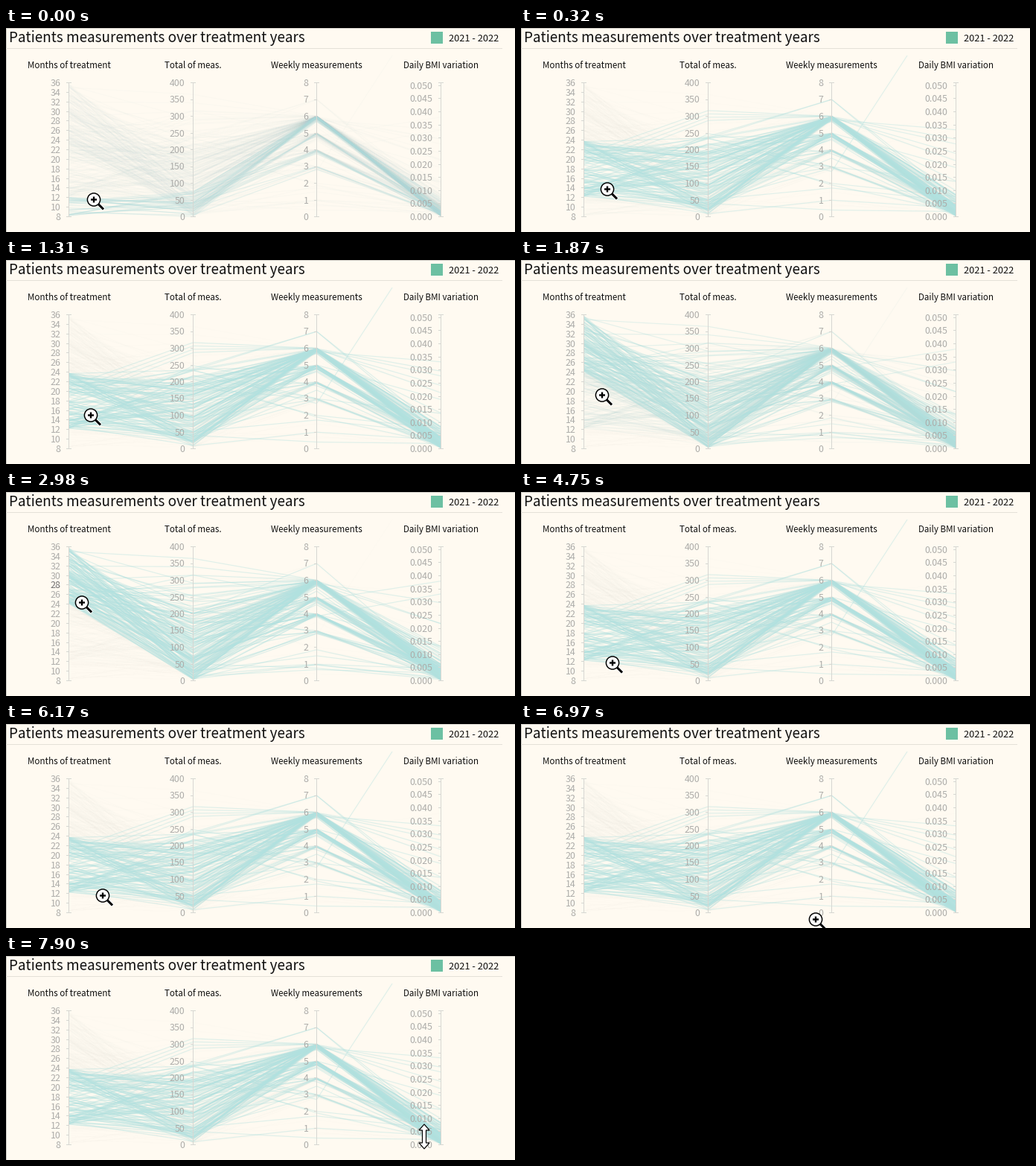
Write a matplotlib script that moves like this. It is 684 by 274 pixels and loops after 8000 ms.

```python
import numpy as np
import matplotlib.pyplot as plt
from matplotlib.animation import FuncAnimation
from matplotlib.collections import LineCollection
from matplotlib.patches import Circle, Polygon, Rectangle
from matplotlib.transforms import Affine2D

W, H = 684, 274
STEP, LOOP = 50, 8000
TOP, BOTTOM = 73.5, 253.5
PAPER, AXIS, TICK = "#fffaf1", "#d6d7d2", "#adadaa"
TEAL = np.array([177, 225, 223]) / 255
DIM = np.array([166, 204, 206]) / 255

plt.rcParams["font.family"] = ["Noto Sans CJK JP", "DejaVu Sans"]
fig = plt.figure(figsize=(W / 72, H / 72), dpi=72, facecolor=PAPER)
ax = fig.add_axes([0, 0, 1, 1])
ax.set(xlim=(0, W), ylim=(H, 0))
ax.axis("off")

# title, low, high, tick step, decimals
AXES = [
    ("Months of treatment", 8, 36, 2, 0),
    ("Total of meas.", 0, 400, 50, 0),
    ("Weekly measurements", 0, 8, 1, 0),
    ("Daily BMI variation", 0, 0.0511, 0.005, 3),
]
XS = 84.5 + 166.67 * np.arange(4)
XS = np.floor(XS) + 0.5


def scale(value, low, high):
    return BOTTOM - (value - low) / (high - low) * (BOTTOM - TOP)


def text(x, y, s, size, color="#111111", ha="left"):
    return ax.text(x, y, s, size=size, color=color, ha=ha, va="baseline", zorder=5)


def rule(xs, ys, color):
    ax.plot(xs, ys, color=color, lw=1, snap=False, solid_capstyle="butt", zorder=4)


# Patient data
rng = np.random.default_rng(12)


def patients(n, months, ends, totals, skew, steady, mean, tail, extra):
    """Random rows of months, total, weekly rate and BMI variation."""
    lo, hi = months
    missed = np.minimum(rng.geometric(steady, n) - 1, 5)
    bmi = rng.exponential(mean, n) + 0.0003
    rows = np.column_stack([
        lo + (hi - lo) * rng.beta(*ends, n),
        totals[0] + (totals[1] - totals[0]) * rng.beta(*skew, n),
        6 - missed - np.minimum(rng.exponential(0.09, n), 0.7),
        np.where(rng.random(n) < tail, rng.uniform(0.008, 0.036, n), bmi),
    ])
    return np.vstack([rows, *extra])


high = [(18 + k, 287 + 10 * k, 6, 0.002 + 0.002 * k) for k in range(4)]
top = [(26 + 3 * k, 290 + 25 * k, 6, 0.002 * k) for k in range(4)]
data = [
    patients(30, (8.2, 12), (0.8, 0.5), (0, 100), (0.9, 1.7), 0.6, 0.0015, 0, []),
    patients(130, (12.3, 23.8), (0.7, 0.8), (8, 253), (1.1, 1.6), 0.58, 0.0027, 0.07,
             [high, [(23.7, 235, 2.7, 0.09), (14, 40, 0.4, 0.002),
                     (20, 240, 7, 0.005), (21, 235, 7, 0.007)]]),
    patients(150, (24.1, 35.8), (0.8, 1.1), (3, 348), (0.75, 2), 0.45, 0.0025, 0.03,
             [top, [(33, 200, 4.8, 0.038), (30, 200, 7, 0.004)]]),
]
window = Rectangle((0, 37), W, H - 37, transform=ax.transData)


def bundle(rows):
    ys = np.column_stack([scale(rows[:, i], a[1], a[2]) for i, a in enumerate(AXES)])
    lines = LineCollection([np.column_stack([XS, y]) for y in ys], linewidths=1.2)
    ax.add_collection(lines, autolim=False)
    lines.set_clip_path(window)
    return lines


groups = [bundle(rows) for rows in data]

# Page and axes
rule([0, W], [0.5, 0.5], "#cfccc5")
rule([0.5, 0.5], [0, H], "#cfccc5")
rule([0, 667], [27.5, 27.5], "#e4e0d8")
text(4, 19, "Patients measurements over treatment years", 18.9)
ax.add_patch(Rectangle((571, 5), 16, 16, color="#6cc0a2", lw=0))
text(595, 18, "2021 - 2022", 12.8)

labels = {}
for x, (title, low, high, step, decimals) in zip(XS, AXES):
    text(x, 54, title, 11.6, ha="center")
    rule([x, x], [TOP - 0.5, BOTTOM + 0.5], AXIS)
    for end in (TOP, BOTTOM):
        rule([x - 3.5, x + 3.5], [end, end], AXIS)
    for v in np.arange(low, high + step / 100, step):
        y = scale(v, low, high)
        row = np.floor(y) + 0.5
        rule([x - 3.5, x], [row, row], AXIS)
        s = f"{v:.{decimals}f}"
        labels[title, s] = text(x - 11, y + 4.5, s, 12.4, TICK, "right")
hovered = labels["Months of treatment", "28"]

# Pointers
place = Affine2D()


def pin(artist):
    artist.set_transform(place + ax.transData)
    artist.set_zorder(9)
    return artist


def stroke(xs, ys, color, width):
    line, = ax.plot(xs, ys, color=color, lw=width, snap=False, solid_capstyle="butt")
    return pin(line)


lens = [
    stroke([6, 13.5], [6, 13.5], "white", 5),
    stroke([6, 13], [6, 13], "black", 3),
    pin(ax.add_patch(Circle((0, 0), 8.6, fc="white", ec="black", lw=1.5))),
    stroke([-4, 4], [0, 0], "black", 2.4),
    stroke([0, 0], [-4, 4], "black", 2.4),
]
half = [(0, -16.5), (7, -8.5), (2.5, -8.5), (2.5, 8.5), (7, 8.5), (0, 16.5)]
outline = half + [(-x, y) for x, y in half[-2:0:-1]]
resize = [pin(ax.add_patch(Polygon(outline, fc="white", ec="black", lw=1.2)))]

# Opacity of the three groups
ALL = (0.28, 0.04, 0.035)
SECOND = (0.004, 0.4, 0.01)
THIRD = (0.004, 0.01, 0.4)

# start, end, goal
FADES = [
    (100, 420, SECOND), (1670, 2070, THIRD), (2980, 3280, SECOND),
    (3380, 3580, ALL), (3700, 3880, SECOND), (4280, 4480, ALL),
    (4570, 4750, SECOND),
]
MOVES = [
    (100, 420, (114, 209)), (1670, 2070, (102, 149)), (2980, 3580, (104, 238)),
    (4280, 4750, (123, 230)), (6130, 6970, (403, 264)), (7070, 7470, (573, 243)),
    (7750, 7900, (562, 243)),
]


def follow(t, first, legs, ease):
    """Value at time t after easing from goal to goal."""
    value = np.array(first, float)
    for start, end, goal in legs:
        p = ease(np.clip((t - start) / (end - start), 0, 1))
        value += (np.array(goal) - value) * p
    return value


def ease_out(p):
    return 1 - (1 - p) ** 3


def linear(p):
    return p


def draw(i):
    t = i * STEP
    for lines, alpha in zip(groups, follow(t, ALL, FADES, ease_out)):
        color = DIM + (TEAL - DIM) * min(1, alpha / 0.38)
        lines.set_color([(*color, alpha)])
        lines.set_zorder(2 + alpha)
    hovered.set_color("#707070" if 1950 <= t < 3080 else TICK)

    x, y = follow(t, (118, 231), MOVES, linear)
    place.clear().translate(round(x), round(y) - 0.5)
    sizing = t >= 7800
    for artist in lens:
        artist.set_visible(not sizing)
    for artist in resize:
        artist.set_visible(sizing)
    return [*groups, hovered, *lens, *resize]


anim = FuncAnimation(fig, draw, frames=LOOP // STEP, interval=STEP,
                     repeat=True, repeat_delay=0, blit=False)
plt.show()
```
